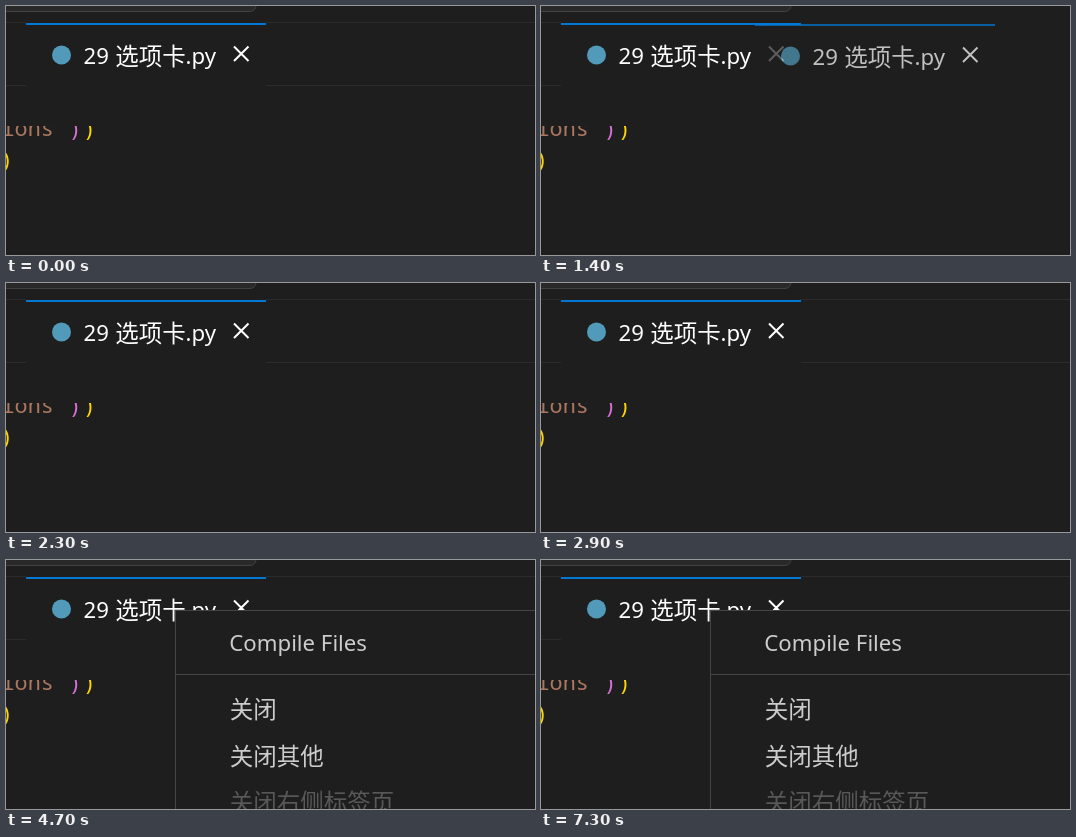
Animation of 529x249 px, one loop 8000 ms. Source, as an HTML page:

```html
<!DOCTYPE html>
<html lang="zh-CN">
<head>
<meta charset="utf-8">
<title>Editor tab</title>
<style>
  html, body { margin: 0; width: 100%; height: 100%; overflow: hidden; background: #1e1e1e; }
  svg { display: block; width: 529px; height: 249px; }
  text { font: 22.2px "Noto Sans", sans-serif; white-space: pre; }
  .cjk { font: 500 23.5px "Noto Sans CJK SC", "Noto Sans CJK", sans-serif; }
  .code { font: 500 21.8px "Noto Sans Mono", monospace; }
  .rule { stroke: #2b2b2b; }
  .menu text { fill: #ccc; }
  .menu .disabled { fill: #585858; font-weight: 400; }
</style>
</head>
<body>
<svg viewBox="0 0 529 249">
  <defs>
    <clipPath id="editorArea"><rect y="120" width="529" height="129"/></clipPath>
    <g id="tab">
      <rect x="20" y="17" width="240" height="63" fill="#1e1e1e"/>
      <rect x="20" y="17" width="240" height="2" fill="#0078d4"/>
      <circle cx="55.5" cy="49" r="9.5" fill="#519aba"/>
      <g fill="#fff">
        <text x="77.6" y="58">29</text>
        <text class="cjk" x="109.3" y="58.5">选项卡</text>
        <text x="179.6" y="58">.py</text>
      </g>
      <path d="M228 40.5l14.5 14.5m0-14.5l-14.5 14.5" stroke="#fff" stroke-width="2"/>
    </g>
  </defs>

  <rect width="529" height="249" fill="#1e1e1e"/>
  <rect x="-20" y="-20" width="270" height="25.5" rx="6" fill="#292929" stroke="#424242"/>
  <path class="rule" d="M0 16.5H20M0 79.5H20"/>
  <path class="rule" id="rightRules" d="M260 16.5H529M260 79.5H529"/>

  <g clip-path="url(#editorArea)">
    <text class="code" x="-4.5" y="129.5" fill="#ab7760">ions'</text>
    <text class="code" x="62.5" y="131" fill="#da70d6">)</text>
    <text class="code" x="76.7" y="131" fill="#ffd700">)</text>
    <text class="code" x="-6" y="162" fill="#ffd700">)</text>
  </g>

  <use href="#tab"/>
  <use href="#tab" id="ghost" opacity=".72"/>

  <g class="menu" id="menu">
    <rect x="169.5" y="50.5" width="400" height="240" fill="#1e1e1e" stroke="#454545"/>
    <path d="M170 114.5H529" stroke="#454545"/>
    <rect id="hover" x="177" y="124" width="380" height="47" rx="5" fill="#04395e"/>
    <text x="223.3" y="91">Compile Files</text>
    <text class="cjk" id="closeItem" x="223.7" y="158">关闭</text>
    <text class="cjk" x="223.7" y="205">关闭其他</text>
    <text class="cjk disabled" x="223.7" y="251.3">关闭右侧标签页</text>
  </g>
</svg>
<script>
const LOOP = 8000, STEP = 100;
const byId = id => document.getElementById(id);
const [ghost, rightRules, menu, hover, closeItem] =
  ['ghost', 'rightRules', 'menu', 'hover', 'closeItem'].map(byId);

// Drag path: time, x offset, y offset
const drag = [
  [500, 10, -5], [700, 105, -13], [900, 227, 4], [1100, 242, 4], [1200, 242, 4],
  [1300, 230, 3], [1700, 86, -7], [2000, 20, -13], [2100, 0, 0]
];

function dragOffset(t) {
  const i = drag.findIndex(key => key[0] > t);
  const [t0, x0, y0] = drag[i - 1], [t1, x1, y1] = drag[i];
  const k = (t - t0) / (t1 - t0);
  return [x0 + (x1 - x0) * k, y0 + (y1 - y0) * k].map(Math.round);
}

function show(element, visible) {
  element.style.display = visible ? '' : 'none';
}

function render(time) {
  const t = Math.floor(time % LOOP / STEP) * STEP;
  const dragging = t >= 500 && t < 2100;
  const hovering = t >= 7200 && t < 7300;
  show(ghost, dragging);
  show(rightRules, !dragging);
  if (dragging) ghost.setAttribute('transform', `translate(${dragOffset(t)})`);
  show(menu, t >= 4500);
  menu.style.opacity = t < 4600 ? 0.7 : 1;
  show(hover, hovering);
  closeItem.style.fill = hovering ? '#fff' : '';
}

const start = performance.now();
function frame() {
  render(performance.now() - start);
  requestAnimationFrame(frame);
}
frame();
</script>
</body>
</html>
```
